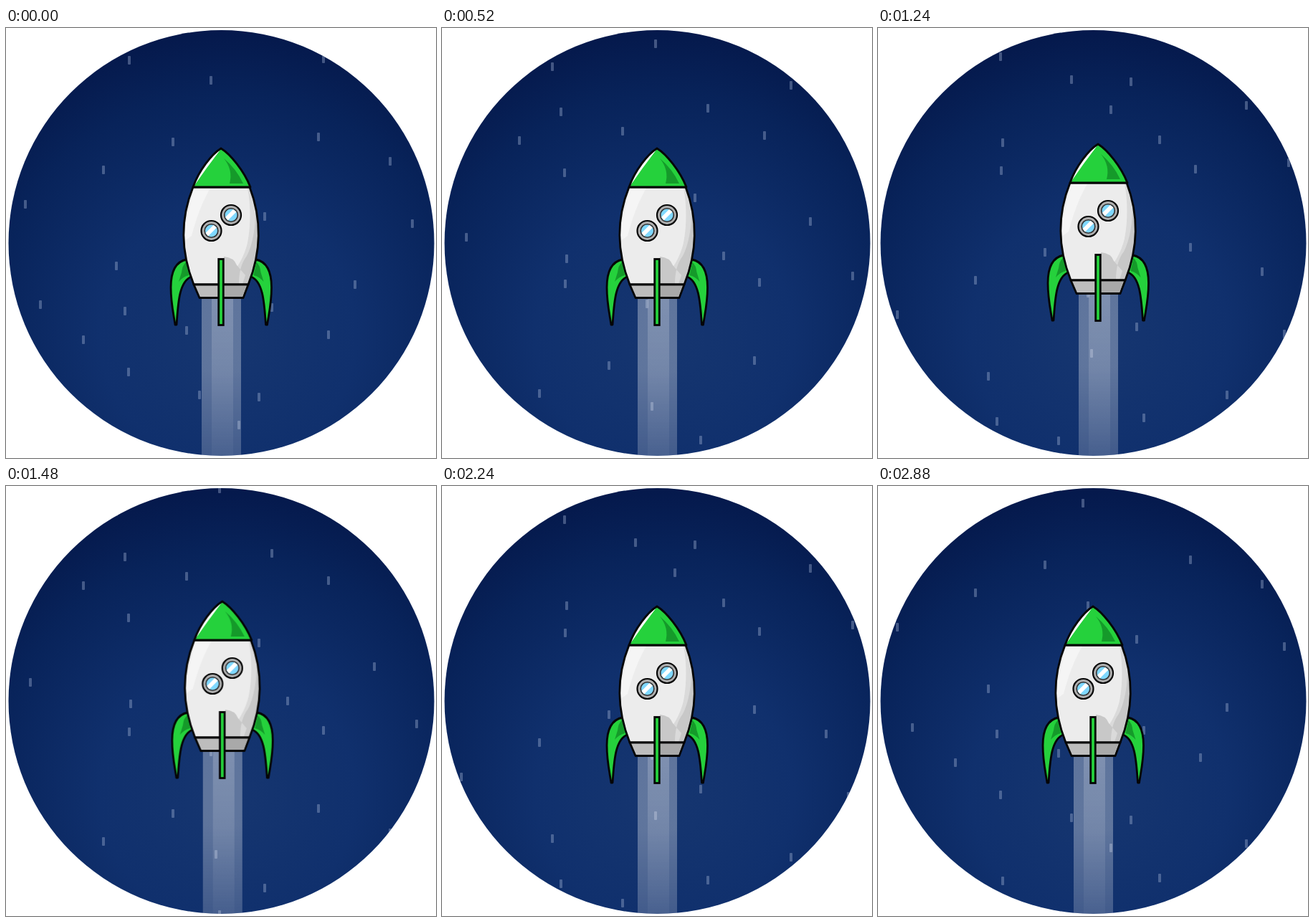
An HTML page that plays this animation: 600 px wide and 600 px high, repeating every 2.92 s.

```html
<!DOCTYPE html>
<html lang="en">
<head>
<meta charset="utf-8">
<title>Rocket flight</title>
<style>
  html, body { margin: 0; width: 100%; height: 100%; overflow: hidden; background: #fff; }
  svg { display: block; width: 100vw; height: 100vh; }
  #sky { animation: fall 2920ms steps(73) infinite; }
  #ship { animation: drift 2920ms infinite; }
  @keyframes fall { to { transform: translateY(1752px); } }
  @keyframes drift {
    0%, 19.2% { transform: translate(0, 0); animation-timing-function: ease-in-out; }
    42.47% { transform: translate(7px, -6px); animation-timing-function: ease-in-out; }
    50.68% { transform: translate(1.7px, -7px); animation-timing-function: ease-in-out; }
    60.5%, 100% { transform: translate(0, 0); }
  }
  .line { stroke: #050505; stroke-width: 2.8; stroke-linejoin: round; }
</style>
</head>
<body>
<svg viewBox="0 0 600 600">
  <defs>
    <clipPath id="disc"><circle cx="300.5" cy="300" r="297"/></clipPath>
    <radialGradient id="night" gradientUnits="userSpaceOnUse" cx="310" cy="430" r="450">
      <stop offset="0" stop-color="#163670"/>
      <stop offset=".4" stop-color="#10306d"/>
      <stop offset=".75" stop-color="#08235a"/>
      <stop offset="1" stop-color="#041648"/>
    </radialGradient>
    <linearGradient id="trail" x1="0" y1="0" x2="0" y2="1">
      <stop offset="0" stop-color="#fff" stop-opacity=".32"/>
      <stop offset=".45" stop-color="#fff" stop-opacity=".32"/>
      <stop offset="1" stop-color="#fff" stop-opacity=".2"/>
    </linearGradient>
    <linearGradient id="core" x1="0" y1="0" x2="0" y2="1">
      <stop offset="0" stop-color="#fff" stop-opacity=".2"/>
      <stop offset="1" stop-color="#fff" stop-opacity=".03"/>
    </linearGradient>
    <g id="stars" fill="#a9b8d8" fill-opacity=".38"></g>
    <path id="hull" d="M261 222C244 264 242 308 262 358H338C358 308 356 264 340 222Z"/>
    <clipPath id="inHull"><use href="#hull"/></clipPath>
    <path id="nose" d="M300 168C287 176 269 199 261 222H341C332 199 313 176 300 168Z"/>
    <g id="fin">
      <path class="line" fill="#25d13c" d="M252 323C236 326 230 342 230 362C230 384 234 400 236 414H238C240 387 241 353 259 347Z"/>
      <path fill="#159a2a" d="M251 327Q246 331 245 341L241 354Q247 347 255 345Z"/>
    </g>
    <g id="port">
      <circle class="line" r="14" fill="#b0b0b0" style="stroke-width:2.2"/>
      <circle r="9.3" fill="#7fd8ff" stroke="#333" stroke-width="1.6"/>
      <path d="M-8 3L3 -8L7.5 -4.5L-4.500 7.500Z" fill="#fff"/>
    </g>
  </defs>

  <g clip-path="url(#disc)">
    <rect width="600" height="600" fill="url(#night)"/>
    <g id="sky">
      <use href="#stars"/>
      <use href="#stars" y="-590"/>
      <use href="#stars" y="-1184"/>
      <use href="#stars" y="-1777"/>
    </g>
    <g id="ship">
      <rect x="273" y="376" width="55" height="230" fill="url(#trail)"/>
      <rect x="287" y="376" width="30" height="230" fill="url(#core)"/>
      <use href="#fin"/>
      <use href="#fin" transform="matrix(-1 0 0 1 600.5 0)"/>

      <use href="#hull" fill="#ececec"/>
      <g clip-path="url(#inHull)">
        <path fill="#f5f5f5" d="M262 222H286Q270 248 259 290L245 300Z"/>
        <path fill="#dadada" d="M337 222Q344 262 337 300Q330 330 303 357H360V222Z"/>
        <path fill="#c8c8c8" d="M348 240Q350 290 336 318Q325 332 325 357H360V240ZM304 319Q318 320 322 331L334 345L330 357H304Z"/>
      </g>
      <use href="#hull" class="line" fill="none"/>

      <path class="line" fill="#bdbdbd" d="M262 358H338L331 376.500H270Z"/>
      <path fill="#a9a9a9" d="M305 360H335L330 375H305Z"/>

      <use href="#nose" fill="#25d13c"/>
      <path fill="#fff" d="M299 170C285 179 270 200 262 221Q279 196 299 170Z"/>
      <path fill="#159a2a" d="M304 182Q317 198 312 217H331Q321 196 304 182Z"/>
      <use href="#nose" class="line" fill="none"/>

      <use href="#port" x="314" y="261"/>
      <use href="#port" x="286.500" y="283"/>
      <rect class="line" x="296.700" y="322.500" width="6.600" height="92" fill="#25d13c" style="stroke-linejoin:miter"/>
    </g>
  </g>
</svg>
<script>
  // Star centres of one tile, as x, y pairs
  const spots = [
    172, 45, 443, 43, 286, 73, 233, 159, 436, 152, 536, 186, 136, 198,
    27, 246, 361, 263, 567, 273, 154, 332, 487, 358, 48, 386, 371, 390,
    166, 395, 252, 422, 108, 435, 450, 428, 171, 480, 270, 512, 353, 515,
    325, 554, 293, 216, 298, 300, 34, 570, 514, 548, 393, 596, 174, 600, 573, 34
  ];
  const tile = document.getElementById("stars");
  for (let i = 0; i < spots.length; i += 2) {
    const star = document.createElementNS("http://www.w3.org/2000/svg", "rect");
    const box = { x: spots[i] - 2, y: spots[i + 1] - 6, width: 4, height: 12, rx: 1 };
    for (const key in box) star.setAttribute(key, box[key]);
    tile.append(star);
  }
</script>
</body>
</html>
```
